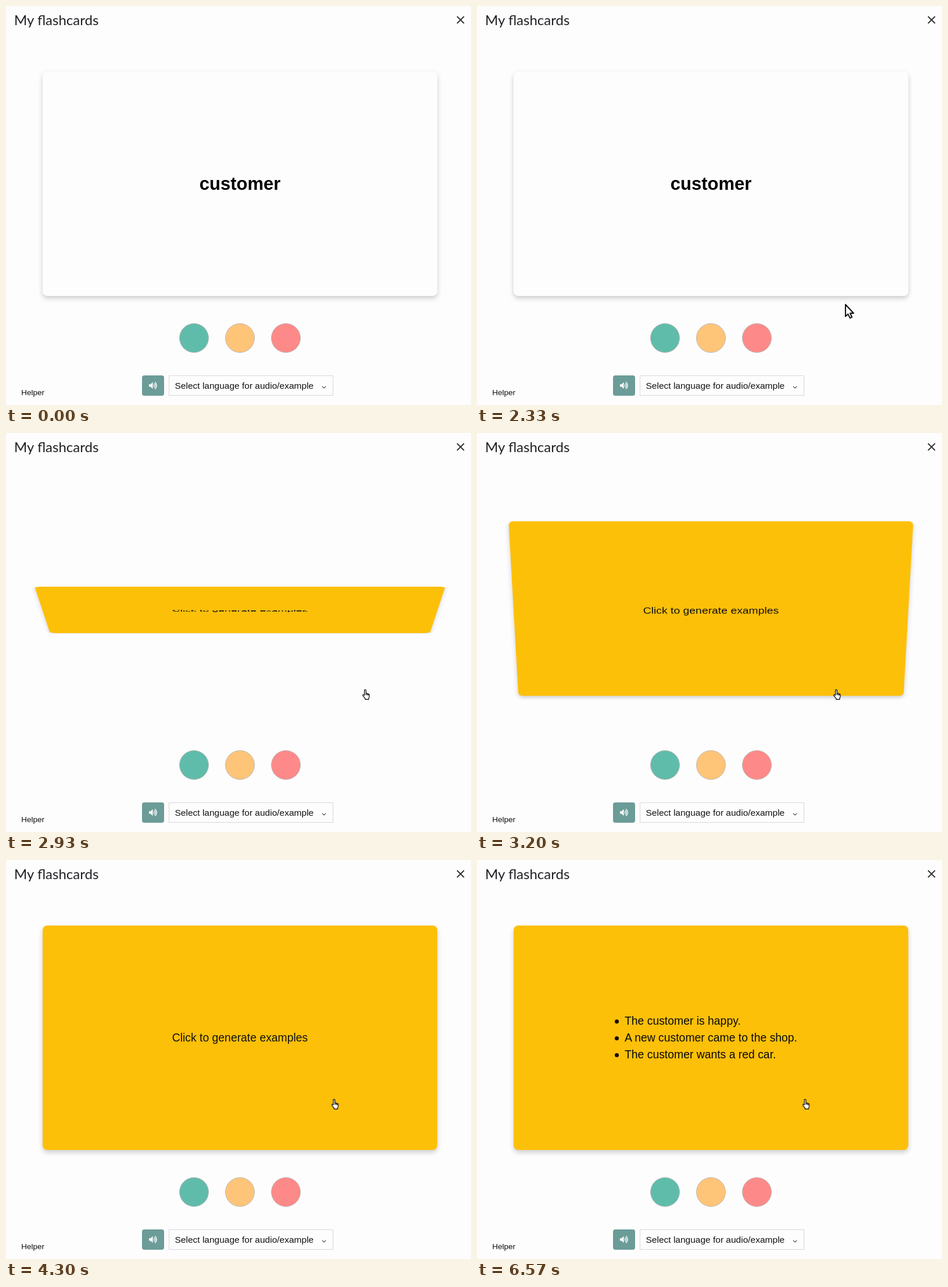
Write an HTML page that moves like this. It is 800 by 688 pixels and loops after 8000 ms.

```html
<!DOCTYPE html>
<html lang="en">
<head>
<meta charset="utf-8">
<title>My flashcards</title>
<style>
html, body { margin: 0; width: 100%; height: 100%; overflow: hidden; background: #fefdfe; }
#stage {
  position: relative; width: 800px; height: 688px; overflow: hidden;
  background: #fefdfe; color: #111;
  font-family: "Liberation Sans", Arial, sans-serif;
}
#stage > * { position: absolute; }
h1 {
  left: 14px; top: 8px; margin: 0; color: #202124; white-space: nowrap;
  font: 400 24px/32px Lato, sans-serif;
}
.scene { left: 63px; top: 113px; width: 679px; height: 387px; perspective: 4900px; }
.card, .face { position: absolute; inset: 0; }
.card { transform-style: preserve-3d; }
.face {
  display: flex; align-items: center; justify-content: center;
  border-radius: 8px; backface-visibility: hidden;
  box-shadow: 0 4px 8px rgba(0, 0, 0, .2);
}
.front { background: #fefdfe; color: #000; font-size: 31px; font-weight: bold; }
.back { background: #fdc008; font-size: 19.37px; transform: rotateX(180deg); }
ul {
  position: absolute; left: 191px; top: 150px; margin: 0; padding: 0;
  list-style: none; line-height: 29.06px; white-space: nowrap; color: #0a0a0a;
}
li { position: relative; }
li::before {
  content: ""; position: absolute; left: -17.3px; top: 12.2px;
  width: 7px; height: 7px; border-radius: 50%; background: #0a0a0a;
}
.dot {
  top: 547px; width: 51px; height: 51px; box-sizing: border-box;
  border: 1px solid #b9b9b5; border-radius: 50%;
}
.audio { left: 234px; top: 637px; width: 38px; height: 35px; border-radius: 4px; background: #6b9c98; }
.select {
  left: 280px; top: 637px; width: 283px; height: 35px; box-sizing: border-box;
  border: 1px solid #d6d5dc; padding-left: 9.5px;
  font-size: 15.5px; line-height: 34px; white-space: nowrap;
}
.helper { left: 26.2px; top: 659px; font-size: 13.55px; line-height: 16px; }
svg { overflow: visible; fill: none; }
#cursor { left: 0; top: 0; width: 0; height: 0; }
#cursor svg { position: absolute; left: 0; top: 0; width: 16px; height: 26px; }
#cursor path { stroke: #000; stroke-linejoin: round; }
</style>
</head>
<body>
<div id="stage">
  <h1>My flashcards</h1>
  <div class="scene">
    <div class="card" id="card">
      <div class="face front">customer</div>
      <div class="face back">
        <span id="prompt">Click to generate examples</span>
        <ul id="list">
          <li>The customer is happy.</li>
          <li>A new customer came to the shop.</li>
          <li>The customer wants a red car.</li>
        </ul>
      </div>
    </div>
  </div>
  <div class="dot" style="left:297.5px;background:#60bcaa"></div>
  <div class="dot" style="left:376.7px;background:#fec478"></div>
  <div class="dot" style="left:456px;background:#fe8989"></div>
  <div class="audio"></div>
  <div class="select">Select language for audio/example</div>
  <div class="helper">Helper</div>
  <svg style="left:0;top:0" width="800" height="688">
    <path d="M776 18l12 12M788 18l-12 12" stroke="#333" stroke-width="1.9"/>
    <path d="M544 655.8l3.1 3 3.1-3" stroke="#333" stroke-width="1.1"/>
    <path d="M246 652.2h2.8l3.7-3.6v11.6l-3.7-3.6h-2.8z" fill="#fff"/>
    <path d="M254 652.4q1.8 2 0 4M255.2 650.2q4 4.2 0 8.4M256.4 648.2q5.8 6.2 0 12.4" stroke="#fff" stroke-width="1.2"/>
  </svg>
  <div id="cursor">
    <svg id="arrow">
      <path d="M1 1V21.5L5.4 17.4L8.8 24.3L12.2 22.7L9 16H15Z" fill="#fff" stroke-width="1.9"/>
    </svg>
    <svg id="hand">
      <path transform="translate(-5 0)" fill="#fff" stroke-width="1.2"
        d="M3.6 10.5V2a1.4 1.4 0 0 1 2.8 0V7.3Q8 6.4 8.6 7.6Q10 7 10.4 8.2Q12 7.8 12 9.5V12Q12 14 10.9 15.5V17.4H5V15.8Q2.6 13 1 10.8Q.4 9.2 1.8 9Q2.8 9.2 3.6 10.5ZM6.4 7.3V10M8.6 7.8V10.2M10.4 8.5V10.4"/>
    </svg>
  </div>
</div>
<script>
const LOOP = 8000;
const HOVER = 2356;
const FLIP = 1755;
const HOLD = 'steps(1, end)';

// rows: [time, value, easing to the next row]
function track(id, prop, rows) {
  const last = rows[rows.length - 1];
  const frames = [...rows, [LOOP, last[1]]].map(([t, value, easing = 'linear']) =>
    ({ offset: t / LOOP, [prop]: value, easing }));
  const anim = document.getElementById(id).animate(frames, { duration: LOOP, iterations: Infinity });
  anim.startTime = document.timeline.currentTime;
}

const switchAt = (id, rows) => track(id, 'opacity', rows.map(([t, v]) => [t, v, HOLD]));
const at = (x, y) => `translate(${x}px, ${y}px)`;

track('cursor', 'transform', [
  [0, at(804, 632)],
  [1037, at(804, 632), 'ease'],
  [1870, at(641, 561)],
  [1970, at(641, 561), 'ease-in'],
  [2330, at(633, 514), 'ease-out'],
  [2730, at(618, 442)],
  [3640, at(618, 442), 'ease-in-out'],
  [4300, at(564.5, 412)]
]);
track('card', 'transform', [
  [0, 'rotateX(0deg)'],
  [HOVER, 'rotateX(0deg)', 'ease'],
  [HOVER + FLIP, 'rotateX(180deg)']
]);
switchAt('arrow', [[0, 1], [HOVER + 15, 0]]);
switchAt('hand', [[0, 0], [HOVER + 15, 1]]);
switchAt('prompt', [[0, 1], [5170, .3], [5200, 0]]);
switchAt('list', [[0, 0], [6570, 1]]);
</script>
</body>
</html>
```
